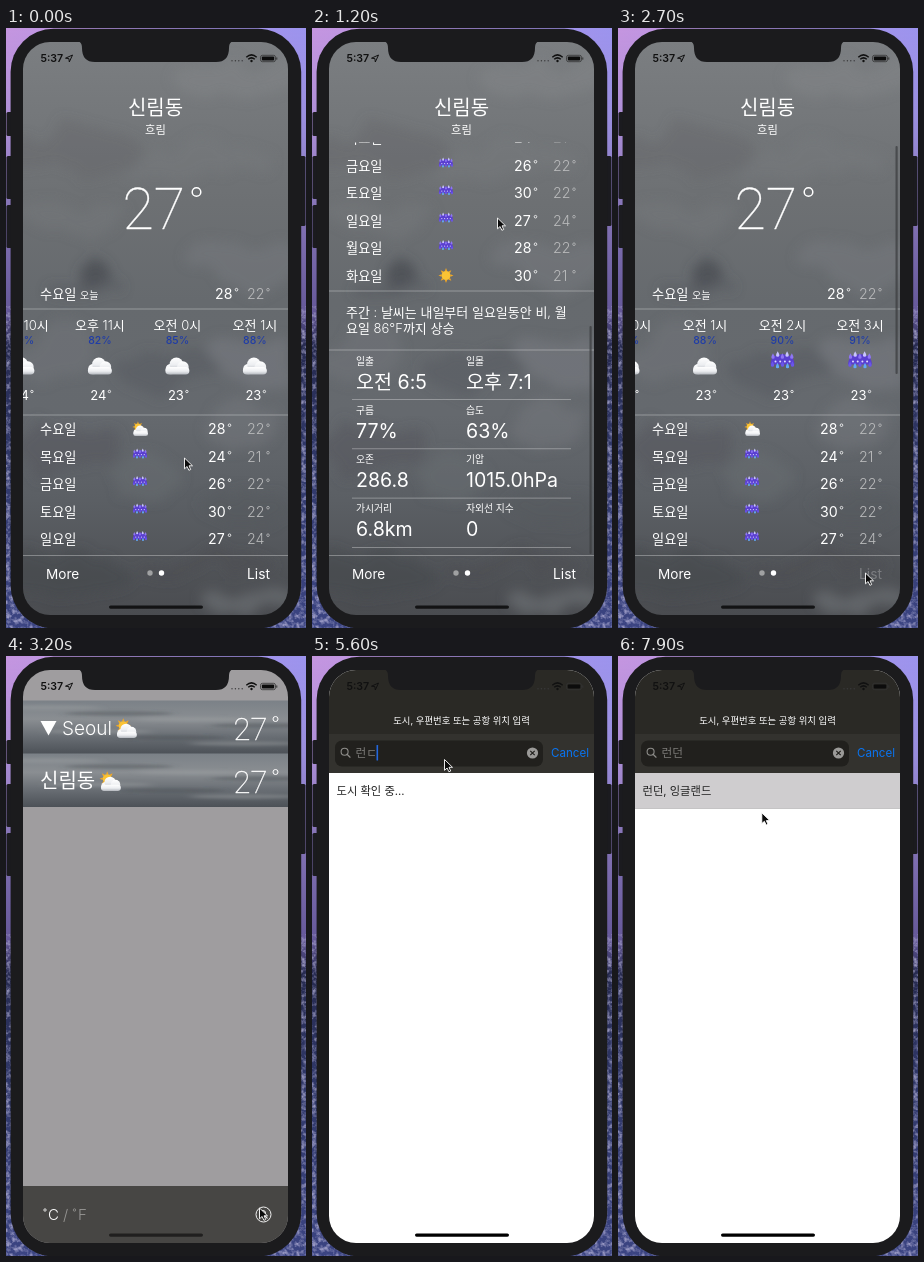
Write an HTML page that moves like this. It is 300 px wide and 600 px high and loops after 8000 ms.

```html
<!DOCTYPE html>
<html lang="ko">
<head>
<meta charset="utf-8">
<style>
html, body { margin: 0; width: 100%; height: 100%; overflow: hidden; background: #1c1c1e; }
svg { display: block; width: 300px; height: 600px; }
text { font-family: Inter, "Noto Sans CJK KR", "Noto Sans CJK", sans-serif; font-weight: 350; white-space: pre; }
.thin { font-family: Roboto, sans-serif; font-weight: 200; stroke: #fff; stroke-width: .35; }
</style>
</head>
<body>
<svg id="stage" viewBox="0 0 300 600"></svg>
<script>
const text = (x, y, s, size, o = {}) =>
  `<text x="${x}" y="${y}" font-size="${size}" fill="${o.fill || '#fff'}" text-anchor="${o.anchor || 'start'}"` +
  `${o.cls ? ` class="${o.cls}"` : ''}${o.weight ? ` style="font-weight:${o.weight}"` : ''}${o.id ? ` id="${o.id}"` : ''}>${s}</text>`;
const rect = (x, y, w, h, fill, r = 0, more = '') =>
  `<rect x="${x}" y="${y}" width="${w}" height="${h}" rx="${r}" fill="${fill}" ${more}/>`;
const dot = (x, y, r, fill) => `<circle cx="${x}" cy="${y}" r="${r}" fill="${fill}"/>`;
const ring = (x, y, r, w, c = '#fff') => `<circle cx="${x}" cy="${y}" r="${r}" fill="none" stroke="${c}" stroke-width="${w}"/>`;
const line = (x1, x2, y) => rect(x1, y - .4, x2 - x1, .8, '#fff', 0, 'opacity=".4"');
const icon = (id, x, y, s = 1) => `<use href="#${id}" transform="translate(${x} ${y}) scale(${s})"/>`;
const blob = (x, y, rx, ry, c, o) => `<ellipse cx="${x}" cy="${y}" rx="${rx}" ry="${ry}" fill="${c}" opacity="${o}"/>`;
const grad = (id, dir, ...stops) => `<linearGradient id="${id}" ${dir}>` +
  stops.map(([at, c]) => `<stop offset="${at}" stop-color="${c}"/>`).join('') + '</linearGradient>';
const down = 'x2="0" y2="1"';
const glass = (x, y, r, c) => ring(x, y, r, 1.1, c) +
  `<path d="M${x + r * .7} ${y + r * .7}l${r * .85} ${r * .85}" stroke="${c}" stroke-width="1.2" stroke-linecap="round"/>`;
const times = (n, f) => Array.from({ length: n }, (_, i) => f(i)).join('');

const cloud = `<g fill="url(#puff)"><circle cx="-6.5" cy="3" r="5.3"/><circle cx="-1" cy="-1.8" r="6.8"/>
  <circle cx="5.5" cy="1" r="5.8"/><rect x="-12" y="1" width="24" height="7.6" rx="3.8"/></g>`;
const rays = times(8, i => `<path d="M-1.7 -6.5L0 -11L1.7 -6.5z" transform="rotate(${i * 45})" fill="#f6a821"/>`);
const drop = (x, y, s, c) => `<path d="M${x} ${y - 3 * s}q${3 * s} ${5 * s} 0 ${5 * s}q${-3 * s} 0 0 ${-5 * s}" fill="${c}"/>`;

const defs = `<defs>
  ${grad('desk', down, [0, '#b49be0'], [.15, '#a18fd4'], [.3, '#8574b6'], [.47, '#66599a'], [.53, '#262a50'], [.7, '#2f3767'], [1, '#3b4482'])}
  ${grad('tint', '', [0, '#d98fe0'], [1, '#7f8bff'])}
  ${grad('fade', down, [0, '#fff'], [.3, '#000'])}
  ${grad('sky', down, [0, '#7b7e81'], [.28, '#6d7073'], [.45, '#666a6e'], [.65, '#65696e'], [.8, '#5b5f64'], [1, '#4a4c50'])}
  ${grad('row', down, [0, '#7b8187'], [.35, '#8a8e92'], [.65, '#6b7076'], [1, '#4c5157'])}
  ${grad('puff', down, [0, '#fff'], [.55, '#eceef1'], [1, '#b4b8be'])}
  <mask id="top"><rect width="300" height="600" fill="url(#fade)"/></mask>
  <filter id="woods"><feTurbulence type="fractalNoise" baseFrequency=".22" numOctaves="3" seed="4"/>
    <feColorMatrix values="0 0 0 0 .5  0 0 0 0 .48  0 0 0 0 .72  2.6 0 0 0 -1.05"/></filter>
  <filter id="soft" x="-20%" y="-20%" width="140%" height="140%"><feTurbulence type="fractalNoise" baseFrequency=".018" numOctaves="4" seed="7" result="n"/>
    <feDisplacementMap in="SourceGraphic" in2="n" scale="46" xChannelSelector="R" yChannelSelector="G"/><feGaussianBlur stdDeviation="6"/></filter>
  <filter id="streak"><feGaussianBlur stdDeviation="5 1.5"/></filter>
  <clipPath id="screen"><rect x="17" y="14" width="265" height="573" rx="27"/></clipPath>
  <clipPath id="view"><rect x="17" y="114.5" width="265" height="412"/></clipPath>
  <g id="cloud">${cloud}</g>
  <g id="sun">${rays}${dot(0, 0, 6.6, '#fbc334')}</g>
  <g id="fair"><g transform="translate(-3 -3) scale(.75)">${rays}${dot(0, 0, 6.6, '#fbc334')}</g>
    <g transform="translate(1 2.5) scale(.9)">${cloud}</g></g>
  <g id="rain"><path d="M-12 4Q-11 -6 -5 -5Q0 -8 5 -5Q11 -6 12 4z" fill="#5a3fd0"/>
    ${times(5, i => drop(-9.5 + i * 4.7, -4 - (i % 2) * 2, 1.1, i % 2 ? '#c9c4ff' : '#8f76f4'))}
    ${times(5, i => drop(-10 + i * 5, 4 + (i % 2) * 1.5, 1.1, i % 2 ? '#62a8fa' : '#6a55ea'))}
    ${times(4, i => dot(-7 + i * 4.7, 1, 1, '#dcd9ff'))}</g>
</defs>`;

// weather page
const sky = rect(17, 14, 265, 573, 'url(#sky)') + `<g filter="url(#soft)">` + [
  [235, 50, 70, 18, '#85888b', .4], [70, 120, 70, 20, '#626569', .35], [200, 135, 80, 18, '#787b7e', .35],
  [60, 190, 60, 14, '#787b7e', .35], [90, 236, 18, 16, '#484b50', .7], [82, 256, 34, 10, '#53565b', .55],
  [240, 235, 60, 25, '#7b7e82', .4], [45, 325, 40, 24, '#74787d', .45], [160, 345, 50, 22, '#575b60', .5],
  [245, 330, 40, 26, '#7b7f84', .5], [235, 400, 40, 24, '#767a7f', .45], [70, 420, 50, 24, '#53565b', .45],
  [140, 450, 36, 18, '#6c7075', .4], [245, 475, 45, 18, '#56595e', .4], [60, 550, 70, 22, '#45474b', .55],
  [200, 540, 70, 10, '#4b4d51', .45], [245, 576, 50, 12, '#727578', .6]
].map(b => blob(...b)).join('') + '</g>';

const temps = (y, hi, lo, x) => text(x, y, hi, 14.2, { weight: 400 }) + ring(x + 21.5, y - 8.8, 1.3, .8) +
  text(241, y, lo, 14.2, { fill: '#b9babb' }) + ring(262, y - 8.8, 1.3, .8, '#b9babb');

const hours = [['오후 10시', 80, 24], ['오후 11시', 82, 24], ['오전 0시', 85, 23], ['오전 1시', 88, 23], ['오전 2시', 90, 23], ['오전 3시', 91, 23]]
  .map(([name, pct, deg], i) => {
    const x = 17 + i * 77.5, mid = { anchor: 'middle' };
    return text(x, 301.5, name, 13, mid) + text(x, 316, pct + '%', 10.5, { anchor: 'middle', fill: '#1f3ca8', weight: 500 }) +
      (i < 4 ? icon('cloud', x, 338) : icon('rain', x, 332.5)) +
      text(x - 1.5, 372, deg, 13, { anchor: 'middle', weight: 400 }) + ring(x + 9.5, 363.5, 1.2, .8);
  }).join('');

const days = [['수', 'fair', 28, 22], ['목', 'rain', 24, 21], ['금', 'rain', 26, 22], ['토', 'rain', 30, 22],
  ['일', 'rain', 27, 24], ['월', 'rain', 28, 22], ['화', 'sun', 30, 21]]
  .map(([d, ic, hi, lo], i) => {
    const y = 401 + i * 27.5;
    return text(34, y + 5, d + '요일', 13.2) + icon(ic, 134, y - (ic == 'rain' ? 2.5 : 0), ic == 'rain' ? .6 : .68) + temps(y + 5, hi, lo, 202);
  }).join('');

const bold = { weight: 400 };
const facts = [['일출', '오전 6:5', '일몰', '오후 7:1'], ['구름', '77%', '습도', '63%'],
  ['오존', '286.8', '기압', '1015.0hPa'], ['가시거리', '6.8km', '자외선 지수', '0']]
  .map(([a, av, b, bv], i) => {
    const y = 651 + i * 49.3;
    return text(44, y + 4, a, 9.8) + text(44, y + 28, av, 19.6, bold) + text(154, y + 4, b, 9.8) + text(154, y + 28, bv, 19.6, bold) +
      line(40, 259, y + 39);
  }).join('');

const weather = sky + text(149.5, 87, '신림동', 20, { anchor: 'middle' }) + text(149.5, 106, '흐림', 11.3, { anchor: 'middle' }) +
  `<g clip-path="url(#view)"><g id="page">
    <g id="now">${text(116.5, 201.3, '27', 57.3, { cls: 'thin' })}${ring(190.5, 164, 4.3, 1.5)}
      ${text(34, 270.5, '수요일', 13.2)}${text(74, 271, '오늘', 10)}${temps(270.5, 28, 22, 209)}</g>
    ${line(17, 282, 281)}<g id="hours">${hours}</g>${line(17, 282, 387)}${days}
    ${line(17, 282, 581.5)}${text(34, 607, '주간 : 날씨는 내일부터 일요일동안 비, 월', 13)}${text(34, 623.5, '요일 86°F까지 상승', 13)}
    ${line(17, 282, 640.5)}${facts}</g></g>
  ${rect(277.5, 118, 2.2, 228, '#3c3d40', 1, 'id="bar"')}${line(17, 282, 527.5)}
  ${text(40, 550.5, 'More', 13.6, bold)}${text(241, 550.5, 'List', 13.8, { weight: 400, id: 'listBtn' })}
  ${dot(144, 545, 2.7, '#a0a1a2')}${dot(155.5, 545, 2.7, '#fff')}`;

// city list
const city = (y, name, x) => rect(17, y, 265, 53.5, 'url(#row)') + `<g filter="url(#streak)">` +
  times(7, i => blob(40 + i * 73 % 240, y + 7 + i * 6, 55, 2.2, i % 2 ? '#4b5056' : '#9b9fa3', .45)) + '</g>' +
  name + icon('fair', x, y + 28, .92) + text(227.5, y + 39, '27', 31, { cls: 'thin' }) + ring(269.5, y + 18.5, 2.5, 1);
const list = rect(17, 14, 265, 573, '#9f9d9f') +
  city(44.5, '<path d="M34.5 65h16l-8 14.5z" fill="#fff"/>' + text(56, 79, 'Seoul', 19, { weight: 300 }), 120) +
  city(97.5, text(34, 132, '신림동', 20), 104) + rect(17, 530, 265, 57, '#474644') +
  ring(39, 554, 1.2, .8) + text(42, 564, 'C', 15) + text(57, 564, '/', 15, { fill: '#979694' }) +
  ring(68.5, 554, 1.2, .8, '#979694') + text(72, 564, 'F', 15, { fill: '#979694' }) +
  ring(257.5, 558.5, 7.5, 1, '#eee') + glass(256.5, 557.5, 3, '#eee');

// search sheet
const search = rect(17, 14, 265, 573, '#fff') + rect(17, 14, 265, 64, '#2a2925') + rect(17, 78, 265, 39, '#33322e') +
  text(149.5, 68, '도시, 우편번호 또는 공항 위치 입력', 9.4, { anchor: 'middle', weight: 400 }) +
  rect(23, 84.5, 253, 26, '#21201d', 7, 'id="field"') + glass(32.6, 95.8, 3.5, '#8d8c89') +
  text(43.5, 101, 'Search', 11.7, { fill: '#7b7a77', weight: 400, id: 'query' }) +
  rect(64.3, 89, 1.6, 15.5, '#2367dd', .5, 'id="caret"') +
  `<g id="clear">${dot(220.5, 97, 5.6, '#9b9a98')}<path d="M218.3 94.8l4.4 4.4m0 -4.4l-4.4 4.4" stroke="#21201d" stroke-width="1.2"/></g>` +
  text(239, 101, 'Cancel', 11.6, { fill: '#0a74f0', weight: 400, id: 'cancel' }) +
  `<g id="pick">${rect(17, 117, 265, 35.5, '#cfcdcf')}${rect(17, 152, 265, .7, '#b8b6b8')}</g>` +
  text(24.5, 139, '', 11.3, { fill: '#222', weight: 400, id: 'result' });

const status = text(34.5, 34, '5:37', 10.6, { fill: '#111', weight: 600 }) +
  `<path d="M59.5 30.2l7 -3.2l-3.2 7l-.4 -3.4z" fill="none" stroke="#111"/>` + times(4, i => dot(226 + i * 3.4, 32.8, .7, '#3a3a3c')) +
  `<g fill="none" stroke="#111" stroke-width="1.5"><path d="M240.3 29.2q5.2 -4.6 10.4 0M242.2 31.3q3.3 -2.9 6.6 0"/></g>` + dot(245.5, 33, 1.2, '#111') +
  rect(254.5, 27.3, 15, 6.4, 'none', 2, 'stroke="#333" stroke-width=".8"') + rect(255.8, 28.5, 12.4, 4, '#0c0c0c', 1) + rect(270.3, 29.2, 1, 2.6, '#333', .5);

const $ = id => document.getElementById(id);
$('stage').innerHTML = defs + rect(0, 0, 300, 600, 'url(#desk)') +
  rect(0, 0, 300, 600, 'url(#tint)', 0, 'opacity=".45" mask="url(#top)"') + rect(0, 308, 300, 292, '#000', 0, 'filter="url(#woods)" opacity=".7"') +
  [[0, 84, 24], [0, 128, 43], [0, 177, 43], [293, 128, 70]].map(([x, y, h]) => rect(x + .5, y, 6, h, '#1b1b1f', 1.5)).join('') +
  rect(4.6, .8, 290.6, 599.6, '#1b1b1d', 43) +
  `<g clip-path="url(#screen)"><g id="weather">${weather}</g><g id="list">${list}</g><g id="search">${search}</g>${status}
    <path d="M70 13q6 0 6 7q0 14 13 14h121q13 0 13 -14q0 -7 6 -7z" fill="#1b1b1d"/></g>` +
  rect(103, 577.5, 94, 3.2, '#000', 1.6, 'id="home"') +
  `<path id="mouse" d="M0 0V10.8L2.6 8.5L4.4 12.3L6.2 11.5L4.5 7.8H8z" fill="#0b0b0b" stroke="#fff" stroke-width=".9" stroke-linejoin="round"/>`;

const clamp = v => Math.max(0, Math.min(1, v));
const ramp = (t, a, b) => clamp((t - a) / (b - a));
const smooth = p => p * p * (3 - 2 * p);
const out = p => 1 - (1 - p) ** 3;
const track = (t, keys) => {
  const i = keys.findIndex(k => k[0] > t);
  if (i < 0) return keys[keys.length - 1].slice(1);
  if (i == 0) return keys[0].slice(1);
  const [a, b] = [keys[i - 1], keys[i]], p = smooth(ramp(t, a[0], b[0]));
  return a.slice(1).map((v, j) => v + (b[j + 1] - v) * p);
};
const latest = (t, steps) => steps.reduce((v, s) => t >= s[0] ? s[1] : v, '');

const mousePath = [[0, 178.5, 430], [300, 178.5, 430], [900, 185.5, 190], [1300, 185.5, 190], [1850, 190, 430],
  [2100, 195, 435], [2600, 247.5, 545], [2850, 247.5, 545], [3150, 253.5, 552], [3500, 253.5, 552], [4080, 128.5, 108],
  [4200, 128.5, 108], [4420, 131, 104], [4600, 131, 104], [4900, 132.5, 103.5], [6900, 132.5, 103.5], [7700, 141, 146], [7900, 143.8, 156.8]];
const scrollPath = [[0, 0], [320, 0], [1080, 318.5], [1330, 318.5], [2080, 0]];
const typing = [[0, 'Search'], [5200, 'ㄹ'], [5400, '러'], [5500, '런'], [5600, '런ㄷ'], [5800, '런더'], [6000, '런던']];
const results = [[5000, '도시 확인 중...'], [6900, '런던, 잉글랜드']];
const blink = [[4600, 0], [4700, 1], [6350, 1], [6620, 0], [6870, 0], [6950, 1], [7350, 1], [7600, 0]];

const set = (id, o) => { for (const k in o) $(id).setAttribute(k, o[k]); };
const move = (id, x, y) => set(id, { transform: `translate(${x} ${y})` });
const show = (id, on) => set(id, { display: on ? 'inline' : 'none' });

function draw(t) {
  const [scroll] = track(t, scrollPath);
  move('page', 0, -scroll);
  set('now', { opacity: clamp(1 - scroll / 130) });
  move('hours', -162.5 * out(ramp(t, 0, 800)), 0);
  set('bar', { y: 118 + scroll / 318.5 * 180, opacity: .75 * ramp(t, 320, 400) * (1 - ramp(t, 2750, 2950)) });
  set('listBtn', { opacity: t >= 2600 ? .25 : 1 });
  show('weather', t < 3180);
  show('list', t < 4050);
  move('list', 0, 590 * (1 - out(ramp(t, 2750, 3180))));
  move('search', 0, 590 * (1 - out(ramp(t, 3500, 4050))));

  const focus = smooth(ramp(t, 4600, 4950)), query = latest(t, typing);
  set('field', { width: 253 - 45 * focus });
  set('cancel', { opacity: focus, x: 239 + 40 * (1 - focus) });
  show('clear', t >= 5200);
  $('query').textContent = query;
  set('caret', { x: t < 5200 ? 43 : 43.5 + query.length * 10.5, opacity: track(t, blink)[0] });
  $('result').textContent = latest(t, results);
  show('pick', t >= 7800);
  set('home', { opacity: t < 2750 ? .75 : t < 3600 ? .55 : 1 });
  move('mouse', ...track(t, mousePath));
}

const start = performance.now();
(function frame() {
  draw((performance.now() - start) % 8000);
  requestAnimationFrame(frame);
})();
</script>
</body>
</html>
```
